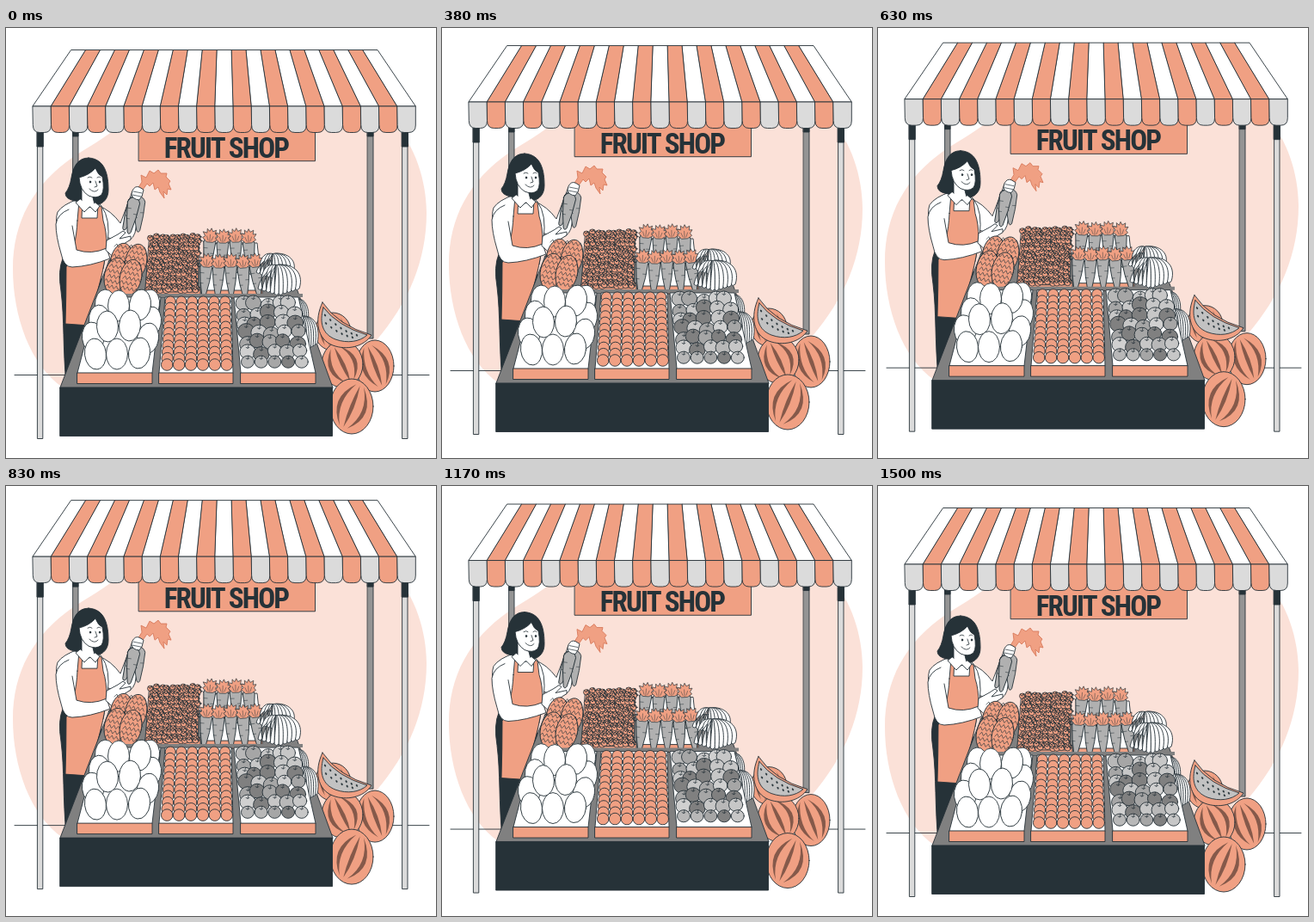
Animation of 500 by 500 pixels, one loop 1540 ms. Source, as an HTML page:

```html
<!DOCTYPE html>
<html lang="en">
<head>
<meta charset="utf-8">
<title>Fruit shop</title>
<style>
html, body { margin: 0; width: 100%; height: 100%; overflow: hidden; background: #fff; }
svg { display: block; width: 100%; height: 100%; }
text { font: 700 33px "Roboto Condensed", "Open Sans Condensed", "Liberation Sans Narrow", Roboto, sans-serif; font-stretch: 75%; letter-spacing: -1.8px; }
</style>
</head>
<body>
<svg viewBox="0 0 500 500"><g id="scene" stroke-linejoin="round" stroke-linecap="round"></g></svg>
<script>
const INK = '#263238', CORAL = '#f0a083', PALE = '#fbe1d8', LIGHT = '#dbdbdb', MID = '#b0b0b0', DARK = '#808080', WHITE = '#fff';
const scene = document.getElementById('scene');

let seed = 7;
const random = () => (seed = seed * 16807 % 2147483647) / 2147483647;
const spread = amount => (random() - .5) * amount;
const range = (n, draw) => Array.from({ length: n }, (_, i) => draw(i)).join('');

const path = (d, fill = 'none', stroke = INK, width = .9) =>
  `<path d="${d}" fill="${fill}" stroke="${stroke}" stroke-width="${width}"/>`;
const poly = (points, fill, stroke) => path(`M${points}Z`, fill, stroke);
const rect = (x, y, w, h, fill, stroke) => path(`M${x} ${y}h${w}v${h}h${-w}z`, fill, stroke);
const oval = (x, y, rx, ry, fill, turn = 0, width = .9) =>
  `<ellipse cx="${x}" cy="${y}" rx="${rx}" ry="${ry}" fill="${fill}" stroke="${INK}" stroke-width="${width}" transform="rotate(${turn} ${x} ${y})"/>`;
const at = (x, y, turn, body, scale = 1) =>
  `<g transform="translate(${x} ${y}) rotate(${turn}) scale(${scale})">${body}</g>`;

function backdrop() {
  return path('M8 280C8 225 32 182 78 150C98 137 116 127 130 115H453C475 135 489 178 489 215C489 270 468 320 430 364L380 403L66 418C28 392 8 335 8 280Z', PALE, 'none')
    + path('M10 403.5H492')
    + rect(78, 121, 6, 60, '#949494') + rect(78, 121, 6, 5, INK)
    + rect(420.5, 121, 6.5, 240, '#949494') + rect(420.5, 121, 6.5, 5, INK);
}

function awning() {
  const n = 21, top = 356 / n, low = 445 / n;
  const stripes = range(n, i => {
    const a = 76 + top * i, b = 31.3 + low * i;
    return poly(`${a} 25.5H${a + top}L${b + low} 91H${b}`, i % 2 ? CORAL : WHITE);
  });
  const flaps = range(n, i =>
    path(`M${31.3 + low * i} 91h${low}v22q0 8.5-8 8.5h${16 - low}q-8 0-8-8.5z`, i % 2 ? CORAL : LIGHT));
  const post = x => rect(x, 122, 6, 355.5, LIGHT) + rect(x - .5, 121, 7, 17, INK);
  return post(36.8) + post(461)
    + rect(154.5, 110, 205, 44.7, CORAL)
    + `<text x="256" y="150.5" text-anchor="middle" fill="${INK}">FRUIT SHOP</text>`
    + stripes + flaps;
}

const carrot = path('M-7 3Q-5-3 0-3Q5-3 7 3Q6 20 2 37Q0 41-2 37Q-6 20-7 3Z', MID)
  + path('M-6 10h4M2 16h3.5M-5 22h3', 'none', INK, .5);
const leaves = path('M-4 3L-9 -2L-6 -4L-9 -9L-4 -8L-4 -13L-1 -10L1 -14L3 -10L7 -12L6 -7L10 -7L7 -3L9 0L4 3Z', CORAL, INK, .7)
  + path('M0 2V-6M-2 1L-4 -4M2 1L4 -4', 'none', INK, .5);

function woman() {
  return path('M66 268Q60 282 64 306C68 338 66 372 70 415H100L112 275Z', INK)
    // raised arm
    + path('M108 207Q122 212 133 227L147 190L158 194L150 238Q146 250 134 248L112 242Z', WHITE)
    // torso
    + path('M84 199Q66 205 60 214Q57 222 60 240L71 277L113 280L118 250Q122 222 111 207L101 198Z', WHITE)
    + path('M83 224L85 201L89 199L88 221H106L107 206L111 208L113 224Q117 236 117 253C114 280 110 292 106 308L98 346L69 344Q70 310 70 278C78 260 82 246 83 224Z', CORAL)
    // folded arm
    + path('M73 211Q60 216 58 228Q58 242 64 262Q67 278 77 278Q98 277 121 268L117 256Q99 264 82 258L77 230', WHITE)
    + path('M116 258L117 247L130 240L136 236L139 238L132 245L145 242L145 246L132 254L124 265Z', WHITE)
    // head
    + path('M96 151C83 151 78 162 76 174Q74 186 69 192Q69 199 80 201L105 206C114 204 119 198 119 188C119 172 116 152 96 151Z', INK)
    + path('M88 186V203Q95 214 103 205L101 197Z', WHITE)
    + path('M86 199L81 203L91 214L97 208M104 203L109 207L104 214L98 208', WHITE)
    + path('M85 174Q97 171 104 163Q107 171 112 173Q115 188 111 194Q105 199 96 195Q86 189 85 174Z', WHITE)
    + path('M95 174q3-2 5 0M106 174q3-2 4 0M104 178l2 6-3 1M97 187q6 6 10 1', 'none', INK, .8)
    + oval(98, 179, .7, 1.2, INK) + oval(109, 179, .7, 1.2, INK)
    // bunch in hand
    + path('M153 187L158 179L157 171L163 174L167 166L172 169L177 165L180 169L187 169L186 173L191 178L189 181L192 188L188 187L187 194L183 190L184 198L179 191L177 185L173 188L171 180L167 184L164 181L159 188Z', CORAL, '#d97a5c')
    + at(150, 199, 20, carrot, .98) + at(155, 199, 2, carrot, .98) + at(149, 200, 9, carrot, 1.02)
    + path('M147 189Q150 183 155 185L160 188Q159 196 155 200Q147 199 146 194Z', WHITE)
    + path('M148 190l10 2M147 194l10 2', 'none', INK, .7);
}

function watermelon(x, y, rx, ry, turn) {
  const stripes = [-.7, 0, .7].map(k => {
    const x0 = k * 7, bulge = k * rx * 1.5;
    return path(`M${x0} ${-ry * .85}Q${bulge - 4} 0 ${x0} ${ry * .85}Q${bulge + 6} 2 ${x0} ${-ry * .85}Z`, '#85594a', 'none');
  }).join('');
  return oval(x, y, rx, ry, CORAL) + at(x, y, turn, stripes, .95);
}

function watermelons() {
  const seeds = range(13, i => {
    const row = i % 2, t = i / 13;
    return oval(371 + t * 40 - row * 2, 334 + t * 24 + row * 7 * (1 - t * .6) + 4 * Math.sin(t * 3.1), .8, 1.4, INK, -30, .2);
  });
  return watermelon(380, 353, 21, 22, 15) + watermelon(429, 393, 22, 30, -20)
    + watermelon(391, 391, 24, 27, -25) + watermelon(402, 440, 25, 32, 22)
    + path('M368 319C358 340 362 362 380 369C396 375 416 371 425 357Q386 346 368 319Z', CORAL)
    + path('M369 325C364 343 368 356 383 362C397 367 411 365 420 357Q386 347 369 325Z', '#c2c2c2')
    + seeds;
}

function pineapple(x, y) {
  const marks = range(24, i => {
    const row = i / 4 | 0;
    return path(`M${(i % 4 - 2) * 5.2 + (row % 2) * 2.6 - 1} ${row * 6 - 15}l2.3-3.5 2.3 3.5`, 'none', INK, .6);
  });
  return at(x, y, 12, oval(0, 0, 12.5, 21, CORAL) + marks);
}

function strawberries() {
  return rect(162, 303, 64, 10, CORAL) + poly('167 243H225L223 307H162', CORAL)
    + range(150, i => {
      const row = i / 10 | 0;
      const x = 170 + i % 10 * 5.8 - row * .22 + spread(4), y = 243 + row * 4.4 + spread(3);
      return oval(x, y, 3.5, 3.2, CORAL, 0, .8)
        + path(`M${x - 2.5} ${y - 2}l2 2 2-3 1 3 2 0`, 'none', INK, 1);
    });
}

function carrots() {
  const row = (n, x, y, gap) => range(n, i => at(x + i * gap, y + i % 2 * 2, 5 - i * 3, carrot))
    + range(n, i => at(x + i * gap, y + i % 2, 5 - i * 3, leaves, .95));
  return poly('231 250H292L298 306H229', WHITE) + rect(229, 305, 69, 9, CORAL)
    + row(4, 237, 246, 15) + row(5, 233, 275, 14.2);
}

function bananas() {
  const banana = (dx, length) =>
    path(`M0 0C${dx * .6}-4 ${dx * 1.25} 6 ${dx} ${length}q-3 3-5 0C${dx * .9 - 4} 12 ${dx * .4} 4 0 0Z`, WHITE);
  // The outer ones hang behind the inner ones.
  const bunch = (x, y, from, to, length) => at(x, y, 0,
    range(5, i => banana(to + (from - to) * i / 9, length - 3 + i * 1.5) + banana(from + (to - from) * i / 9, length - 3 + i * 1.5)));
  return bunch(310, 263, -14, 24, 24) + bunch(314, 276, -16, 27, 30)
    + bunch(337, 316, -4, 14, 30) + bunch(343, 336, -4, 19, 34);
}

function apples() {
  const tones = ['#c7c7c7', '#a6a6a6', '#b8b8b8', DARK, '#c7c7c7', '#d0d0d0'];
  return range(35, i => {
    const row = i / 5 | 0, t = row / 6, front = row === 6;
    const x = 274 + t * 7 + i % 5 * (14.2 + t * 1.5) + (front ? 0 : spread(6));
    const y = 321 + row * 11.2 + (front ? 0 : spread(5));
    const r = front ? 7.5 : 8 + random() * 1.8;
    return oval(x, y, r, r * .94, tones[random() * 6 | 0])
      + path(`M${x - 2} ${y - r * .55}q2 2 4 0m-2 1l1-4`, 'none', INK, .7);
  });
}

function stand() {
  const crate = (left, right, topLeft, topRight) =>
    poly(`${left} 401L${topLeft} 313H${topRight}L${right} 401`, WHITE) + rect(left, 401, right - left, 12.5, CORAL);
  const melons = [[116, 322], [166, 322], [168, 342], [109, 340], [165, 361], [101, 360], [131, 323], [156, 322],
    [118, 347], [144, 346], [104, 379], [129, 379], [155, 378]];
  const oranges = range(66, i => {
    const row = i / 6 | 0, t = row / 10;
    return oval(223 - t + (i % 6 - 2.5) * (12.7 + t * 1.2), 318 + row * 7.35, 6.1 + t * .7, 6.1 + t * .7, CORAL);
  });
  return poly('63 418L120 270H326L380 418', DARK) + rect(63, 418, 316.5, 56.5, INK)
    + pineapple(134, 271) + pineapple(151, 272) + pineapple(127, 288) + pineapple(145, 290)
    + strawberries() + carrots()
    + poly('108 313H345V309H110', DARK, 'none')
    + bananas()
    + crate(83, 170, 106, 180) + crate(178, 264, 185, 262) + crate(273, 360, 265, 340)
    + melons.map(([x, y]) => oval(x, y, 12.5, 18, WHITE, (129 - x) * -.25)).join('')
    + oranges + apples();
}

scene.innerHTML = backdrop() + woman() + watermelons() + stand() + awning();

// Floats up 10px and back at a constant speed, in 24 steps per second.
function tick(now) {
  const step = Math.floor((now % 1540 + 4.9) * .024) % 36;
  const lift = 10 * (1 - Math.abs(step / 18 - 1));
  scene.setAttribute('transform', `translate(0 ${-lift})`);
  requestAnimationFrame(tick);
}
tick(0);
</script>
</body>
</html>
```
